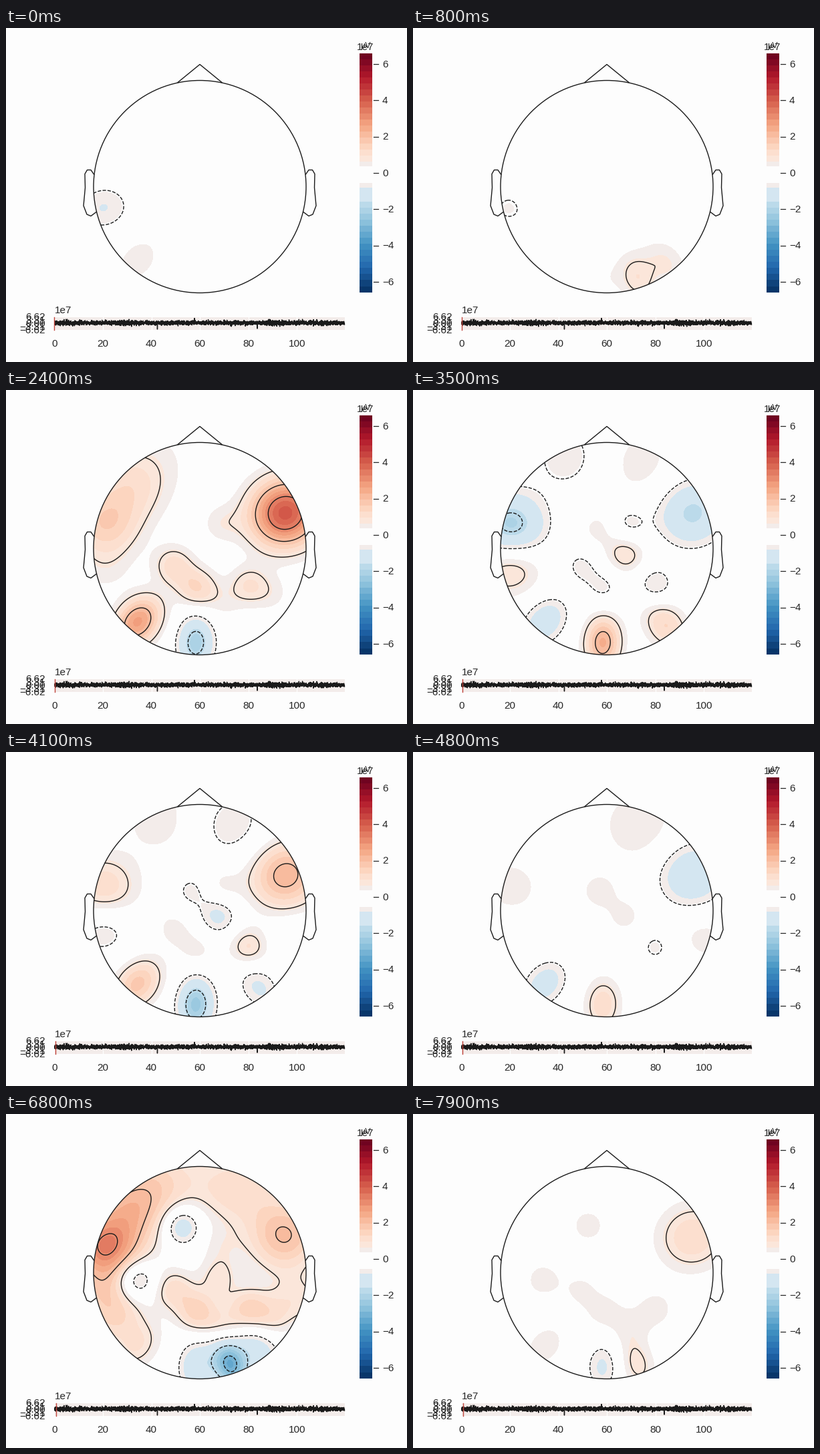
These frames come from a looping animation (600x500 px, 8000 ms). A matplotlib script:

```python
import numpy as np
import matplotlib.pyplot as plt
from matplotlib.animation import FuncAnimation
from matplotlib.patches import Circle, Rectangle

W, H, FRAMES = 600, 500, 80
BG, INK, GRAY = "#fdfdfd", "#1a1a1a", "#f3ecea"
VMAX = 6.62
CX, CY, R = 290, 237.5, 159

# Electrode positions on the scalp
SITES = dict(
    Fp1=(230, 100), Fp2=(338, 110), F7=(186, 145), F8=(388, 130),
    F3=(262, 167), F4=(322, 200), FCz=(278, 208), T7=(147, 201),
    T8=(418, 184), C3=(194, 248), Cz=(318, 246), TP9=(146, 269),
    TP10=(437, 278), CP=(251, 263), Pz=(286, 296), P4=(363, 292),
    PO4=(398, 305), POz=(325, 320), P9=(165, 308), P7=(197, 347),
    P8=(378, 352), Oz=(284, 378), O2=(335, 374),
)

# Active electrodes at each moment: (frame, {electrode: potential})
MOMENTS = [
    (0, dict(TP9=-.85, P7=.56)),
    (8, dict(TP9=-.62, C3=.37, Oz=.3, O2=.9, P8=.65)),
    (24, dict(T8=4.1, T7=1.45, F7=1, Fp1=.3, TP9=.4, P7=2.7, CP=1.1, Pz=1.25,
              P4=.9, PO4=.4, POz=.35, F4=.5, Oz=-2.2)),
    (35, dict(Fp1=-.75, Fp2=.53, T8=-1.75, T7=-2.05, P7=-1.35, CP=-.62,
              Pz=-.62, P4=-.85, F4=-.72, FCz=.5, Cz=1, TP9=1.1, Oz=2.35,
              P8=1.3)),
    (48, dict(Fp2=.62, FCz=.5, T7=.5, Cz=.47, P4=-.65, TP10=.5, Oz=1.2,
              T8=-1.5, P7=-1.2)),
    (68, dict(T7=3, F7=1.7, TP9=1.2, P9=1, P7=.9, Fp1=1.1, Fp2=1, F8=.35,
              T8=1.9, TP10=.8, CP=1.1, Pz=1.4, P4=1.35, PO4=.7, POz=.8, Cz=.8,
              F4=.4, F3=-1.6, C3=-1.6, Oz=-1.4, O2=-3.3, P8=-1.2)),
    (79, dict(T8=1.25, F3=.5, C3=.5, CP=.4, Pz=.48, POz=.42, O2=.85, P4=.5,
              P7=.52, Oz=-.95)),
]
TIMES = [t for t, _ in MOMENTS]

gx, gy = np.meshgrid(np.arange(128, 453, 2.0), np.arange(76, 400, 2.0))


def spread(x, y):
    """Gaussian bump; rim bumps widen forward and narrow at the back."""
    ux, uy = x - CX, y - CY
    dist = np.hypot(ux, uy)
    if dist > .85 * R:
        across, along = 50 - y / 12, 46 - y / 20
    else:
        across = along = 21
    radial = ((gx - x) * ux + (gy - y) * uy) / dist
    tangent = ((gy - y) * ux - (gx - x) * uy) / dist
    return np.exp(-((radial / along) ** 2 + (tangent / across) ** 2) / 2)


BUMPS = {name: spread(*xy) for name, xy in SITES.items()}
MAPS = [sum(v * BUMPS[name] for name, v in act.items()) for _, act in MOMENTS]


def field(i):
    """Cross-fade neighbouring maps while their polarity oscillates."""
    k = min(np.searchsorted(TIMES, i, side="right") - 1, len(TIMES) - 2)
    span = TIMES[k + 1] - TIMES[k]
    u = (i - TIMES[k]) / span
    wave = np.cos(2 * np.pi * round(span / 9) * u)
    mix = np.cos(np.pi * u / 2) * MAPS[k] + np.sin(np.pi * u / 2) * MAPS[k + 1]
    return np.clip(wave * mix, -6.6, 6.6)


NEG = -np.r_[np.linspace(VMAX, 1.6, 16), .83, .58]
POS = np.r_[.36, .62, np.linspace(.95, VMAX, 18)]
EDGES = np.r_[NEG, POS]
mids = (EDGES[1:] + EDGES[:-1]) / 2
COLORS = list(plt.get_cmap("RdBu_r")(mids / (2 * VMAX) + .5))
zero = len(NEG) - 1
COLORS[zero] = BG
COLORS[zero - 1] = COLORS[zero + 1] = GRAY
LINES = np.arange(-4.3, 5, 1.25)

plt.rcParams["font.family"] = "Liberation Sans"
fig = plt.figure(figsize=(W / 100, H / 100), dpi=100, facecolor=BG)
ax = fig.add_axes([0, 0, 1, 1])
ax.set(xlim=(0, W), ylim=(H, 0))
ax.axis("off")


def line(x, y, color=INK, lw=1.0, z=5):
    return ax.plot(x, y, color=color, lw=lw, zorder=z)[0]


def label(x, y, s, ha="center", size=11):
    ax.text(x, y - .8, s, size=size, color="#262626", ha=ha,
            va="center_baseline")


def box(x, y, w, h, color):
    ax.add_patch(Rectangle((x, y), w, h, fc=color, ec="none", lw=0, zorder=1))


def draw_head():
    ax.add_patch(Circle((CX, CY), R, fill=False, ec=INK, lw=1.0, zorder=5))
    line([257, 290, 323], [81.5, 54.5, 81.5])
    ear = np.array([(131.5, 219), (127, 212.5), (121.5, 212.5), (118, 218.5),
                    (118.5, 239), (116, 266), (121, 279), (127, 281.5),
                    (135, 275.5)])
    line(ear[:, 0], ear[:, 1])
    line(2 * CX - ear[:, 0], ear[:, 1])


def draw_colorbar():
    def y(v):
        return 216.8 - 27.0 * v
    for lo, hi, c in zip(EDGES[:-1], EDGES[1:], COLORS):
        box(529, y(hi), 19, y(lo) - y(hi), c)
    for v in range(-6, 7, 2):
        ty = 217 - 27.15 * v
        line([550, 557], [ty, ty], "#262626", .9)
        label(563, ty, str(v).replace("-", "\u2212"), "left")
    label(538, 28, "1e7")
    label(538, 26, "\u00b5V", size=9)


def draw_strip():
    box(72.5, 433, 434.5, 19, GRAY)
    for v in range(0, 101, 20):
        x = 72.3 + 3.63 * v
        line([x, x], [433, 452], "white", .8, 2)
        label(x, 472, str(v))
    for v in np.linspace(VMAX, -VMAX, 5):
        label(59, 442 - v * 10 / VMAX, f"{v:.2f}".replace("-", "\u2212"),
              "right")
    label(73, 422, "1e7", "left")
    rng = np.random.default_rng(4)
    x = np.linspace(73, 506.5, 4300)
    swell = 1.6 + .25 * np.sin(x / 17) * np.sin(x / 41 + 1)
    for burst in (88, 405, 478):
        swell += .4 * np.exp(-((x - burst) / 9) ** 2)
    y = 441.5 + np.clip(swell * rng.standard_normal(x.size), -5.5, 5.5)
    for spike, tip in ((226.5, 451), (282, 434.5), (376, 450)):
        y[np.argmin(abs(x - spike))] = tip
    line(x, y, INK, 1.0, 3)


draw_head()
draw_colorbar()
draw_strip()
cursor = line([72.3, 72.3], [433, 452], "#c0443c", 1.0, 4)
scalp_clip = Circle((CX, CY), R, transform=ax.transData)
layers = []


def draw(i):
    while layers:
        layers.pop().remove()
    z = field(i)
    layers.append(ax.contourf(gx, gy, z, levels=EDGES, colors=COLORS, zorder=1))
    shown = [v for v in LINES if z.min() < v < z.max()]
    if shown:
        layers.append(ax.contour(gx, gy, z, levels=shown, colors=INK,
                                 linewidths=1.0, zorder=3))
    for layer in layers:
        layer.set_clip_path(scalp_clip)
    x = 72.3 + .037 * i
    cursor.set_xdata([x, x])
    return [*layers, cursor]


anim = FuncAnimation(fig, draw, frames=FRAMES, interval=100,
                     init_func=lambda: draw(0), repeat=True, repeat_delay=0)
plt.show()
```
